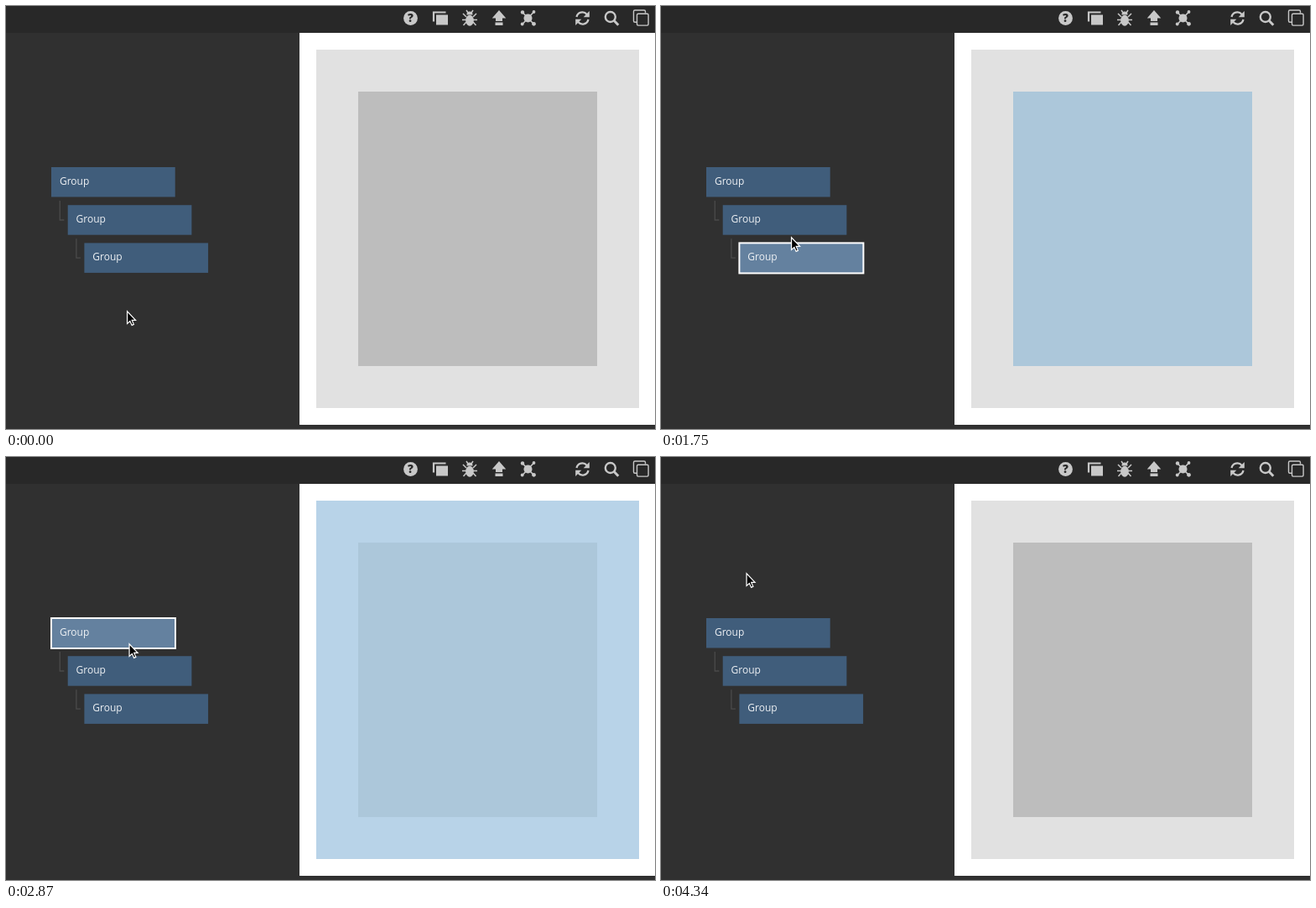
Write an HTML page that moves like this. It is 774 px wide and 504 px high and loops after 5110 ms.

```html
<!DOCTYPE html>
<html lang="en">
<head>
<meta charset="utf-8">
<title>Group hover</title>
<style>
  html, body { margin: 0; width: 774px; height: 504px; overflow: hidden; background: #303030; }
  svg { display: block; }
  text { font-family: "Open Sans", "Noto Sans", sans-serif; }
  .label { font-size: 12px; fill: #eef1f4; }
  .box { fill: #405d7b; }
  .hover .box { fill: #64819f; }
  .ring { fill: none; stroke: #fff; stroke-width: 2; visibility: hidden; }
  .edge .ring { visibility: visible; }
  .link { fill: none; stroke: #4a4a4a; stroke-width: 1.3; }
  .icons { fill: #c8c8c8; stroke: #c8c8c8; stroke-width: 0; }
  .icons .line { fill: none; }
</style>
</head>
<body>
<svg width="774" height="504" viewBox="0 0 774 504">
  <rect width="774" height="504" fill="#303030"/>
  <rect width="774" height="32" fill="#282828"/>

  <g class="icons">
    <circle cx="482.5" cy="14.5" r="8.4"/>
    <text x="482.5" y="19.4" text-anchor="middle" font-size="13.5" font-weight="800" fill="#282828">?</text>

    <path class="line" d="M510 18.5V7.5H524.5" stroke-width="2.2"/>
    <rect x="513" y="10.5" width="14" height="12"/>

    <g transform="translate(553 14)">
      <path class="line" d="M-4 -1L-8 -5M4 -1L8 -5M-4 2.5H-9M4 2.5H9M-4 5L-7.5 9M4 5L7.5 9M-2 -6L-4 -9M2 -6L4 -9" stroke-width="1.5"/>
      <path d="M-3.6 -3.6A3.6 4 0 0 1 3.6 -3.6Z"/>
      <ellipse cy="3.2" rx="4.8" ry="6.5"/>
    </g>

    <path d="M588 5L596.3 14.5H592V18H584V14.5H579.7ZM583.5 19.5H592.5V23H583.5Z"/>

    <g transform="translate(622.5 14.5)">
      <path class="line" d="M-6.5 -7L0 0L7 -7.5M-6.5 7L0 0L7 7" stroke-width="1.6"/>
      <circle r="5"/>
      <circle cx="-6.5" cy="-7" r="2.2"/>
      <circle cx="7" cy="-7.5" r="1.9"/>
      <circle cx="-6.8" cy="7" r="1.9"/>
      <circle cx="7" cy="6.8" r="2.4"/>
    </g>

    <g transform="translate(687.5 14.5)">
      <g id="turn">
        <path class="line" d="M-7 -1.5A7 7 0 0 1 5.2 -4.6" stroke-width="2.3"/>
        <path d="M8.3 -8.5V-1.3H1.2Z"/>
      </g>
      <use href="#turn" transform="rotate(180)"/>
    </g>

    <circle class="line" cx="720.8" cy="13" r="6" stroke-width="2.4"/>
    <path class="line" d="M725 17.2L730.3 22.7" stroke-width="3"/>

    <g stroke-width="1.4" transform="translate(-.5 -.5)">
      <path class="line" d="M752.5 19.8H750.5Q749 19.8 749 18.3V7Q749 5.5 750.5 5.5H761.5Q763 5.5 763 7V9"/>
      <rect class="line" x="753" y="9.8" width="13.6" height="13.8" rx="1.5"/>
    </g>
  </g>

  <rect class="panel" x="350" y="32" width="424" height="467"/>
  <rect class="panel" x="370" y="52" width="385" height="427"/>
  <rect class="panel" x="420" y="102" width="285" height="327"/>

  <path class="link" d="M64.3 232V255H69.3M83.9 277.2V300.2H88.9"/>
  <g id="groups"></g>

  <g id="cursor">
    <path transform="scale(.93)" d="M.6 .8V16.6L4.2 13.4L6.6 18.7L9 17.6L6.7 12.3H11.4Z" fill="#000" stroke="#fff" stroke-width="1.3"/>
  </g>
</svg>
<script>
const LOOP = 5110, STEP = 70;
const OFF = ["#ffffff", "#e1e1e1", "#bdbdbd"];
const ON = ["#c7e3f9", "#b8d3e8", "#acc7da"];

const linear = p => p;
const speedUp = p => p ** 1.5;
const slowDown = p => 1 - (1 - p) ** 1.8;
const smooth = p => (1 - Math.cos(Math.PI * p)) / 2;

// Pointer path: time, x, y, easing towards the point
const path = [
  [0, 144, 363, linear],
  [560, 156, 314, speedUp],
  [770, 157, 299, slowDown],
  [1330, 157, 299, linear],
  [1750, 155, 275, speedUp],
  [2030, 153, 264, slowDown],
  [2590, 153, 264, linear],
  [2870, 146.5, 222, speedUp],
  [3010, 145, 213, slowDown],
  [3150, 144, 211, slowDown],
  [3640, 144, 211, linear],
  [4270, 101.5, 138, smooth],
  [LOOP, 101.5, 138, linear]
];

// From each time on: hovered group, ringed, outermost blue panel (3 = none)
const states = [
  [0, -1, false, 3],
  [560, 2, true, 3],
  [700, 2, false, 2],
  [1680, 2, true, 2],
  [1820, 1, true, 2],
  [1960, 1, false, 1],
  [2800, 1, true, 1],
  [2870, 0, true, 1],
  [3010, 0, false, 0],
  [3850, 0, true, 0],
  [3990, -1, false, 3]
];

const holder = document.getElementById("groups");
holder.innerHTML = [0, 1, 2].map(i => `
  <g transform="translate(${54 + 19.7 * i} ${192 + 45.2 * i})">
    <rect class="box" width="147.7" height="35.5"/>
    <rect class="ring" width="148" height="36"/>
    <text class="label" x="9.9" y="20.8">Group</text>
  </g>`).join("");
const groups = [...holder.children];
const panels = document.querySelectorAll(".panel");
const cursor = document.getElementById("cursor");

function pointerAt(t) {
  const i = path.findIndex(k => k[0] > t);
  const [t0, x0, y0] = path[i - 1];
  const [t1, x1, y1, ease] = path[i];
  const p = ease((t - t0) / (t1 - t0));
  return [x0 + (x1 - x0) * p, y0 + (y1 - y0) * p];
}

function draw(t) {
  const [, hovered, ringed, firstBlue] = states.filter(s => s[0] <= t).pop();
  groups.forEach((g, i) => {
    g.classList.toggle("hover", i === hovered);
    g.classList.toggle("edge", i === hovered && ringed);
  });
  panels.forEach((p, i) => p.setAttribute("fill", (i >= firstBlue ? ON : OFF)[i]));
  cursor.setAttribute("transform", `translate(${pointerAt(t)})`);
}

const start = performance.now();
function tick() {
  const t = (performance.now() - start) % LOOP;
  draw(Math.floor(t / STEP) * STEP);
  requestAnimationFrame(tick);
}
tick();
</script>
</body>
</html>
```
